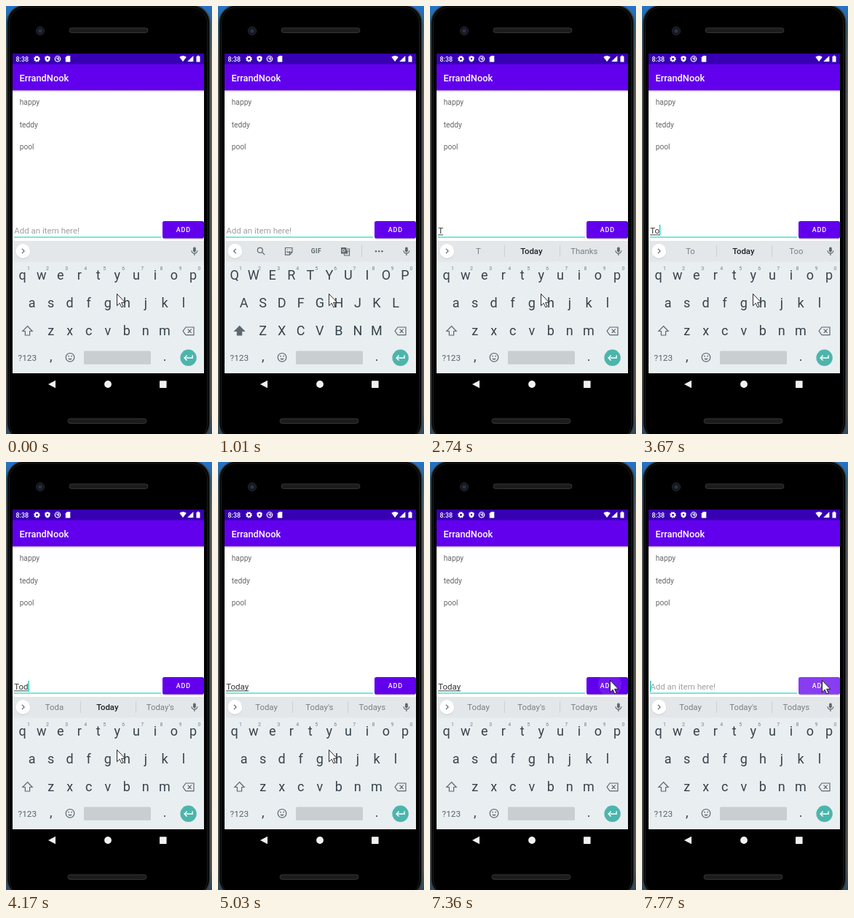
An HTML page that plays this animation: 283x585 px, repeating every 8 s.

```html
<!DOCTYPE html>
<html lang="en">
<head>
<meta charset="utf-8">
<title>To-do list</title>
<style>
html, body { margin: 0; width: 100%; height: 100%; overflow: hidden; background: #55585b; }
svg { display: block; width: 100%; height: 100%; font-family: Roboto, "Noto Sans", sans-serif; }
.mid { text-anchor: middle; }
.medium { font-weight: 500; }
.key { font-size: 18px; fill: #37434a; }
.digit { font-size: 7px; fill: #78838a; }
.tip { font-size: 11.4px; fill: #788086; }
.best { font-weight: 500; fill: #1d2327; }
.line { fill: none; stroke: #5d696f; stroke-width: 1.2; }
.solid { fill: #5d696f; }
</style>
</head>
<body>
<svg viewBox="0 0 283 585">
  <defs>
    <linearGradient id="desk" x2="0" y2="1">
      <stop offset="0" stop-color="#2672c8"/><stop offset=".05" stop-color="#27667d"/>
      <stop offset=".12" stop-color="#5b6063"/><stop offset=".95" stop-color="#53575a"/>
      <stop offset="1" stop-color="#294b63"/>
    </linearGradient>
    <linearGradient id="shade" x2="0" y2="1">
      <stop offset="0" stop-opacity=".25"/><stop offset="1" stop-opacity="0"/>
    </linearGradient>
    <clipPath id="button"><rect x="215" y="294" width="57" height="23.5" rx="2.6"/></clipPath>
  </defs>

  <!-- phone -->
  <rect width="283" height="585" fill="url(#desk)"/>
  <rect x="1.5" y="-1" width="278.5" height="595" rx="24" fill="#070707" stroke="#3b3d3f" stroke-width="1.6"/>
  <rect x="4.5" y="2" width="272" height="590" rx="21" fill="#000" stroke="#1b1b1c"/>
  <circle cx="47" cy="34" r="5.6" fill="#15171c" stroke="#25272b"/>
  <circle cx="47" cy="34" r="2.6" fill="#26324f"/>
  <g fill="#1c1c1d" stroke="#353536">
    <rect x="87" y="30" width="108" height="6.5" rx="3.2"/>
    <rect x="85" y="564" width="108" height="6.5" rx="3.2"/>
  </g>
  <g fill="#f1f1f1">
    <path d="M58 517l10-5.3v10.6z"/><circle cx="140" cy="517" r="4.9"/>
    <rect x="211" y="512.3" width="9.6" height="9.6" rx=".6"/>
  </g>

  <!-- app -->
  <rect x="9" y="65" width="263" height="437" fill="#fff"/>
  <rect x="9" y="115" width="263" height="3" fill="url(#shade)"/>
  <rect x="9" y="65" width="263" height="15" fill="#3700b3"/>
  <rect x="9" y="79.5" width="263" height="35.8" fill="#6200ee"/>
  <g fill="#fff">
    <text x="13.5" y="75.6" font-size="8.9" class="medium">8:38</text>
    <circle cx="42.5" cy="72.3" r="2.5" fill="none" stroke="#fff" stroke-width="2"/>
    <circle cx="42.5" cy="72.3" r="3.8" fill="none" stroke="#fff" stroke-width="1.2" stroke-dasharray="1.5 1.48"/>
    <path d="M57 68l3.6 1.5v2.6q0 3-3.6 4.5q-3.6-1.5-3.6-4.5v-2.6z"/>
    <circle cx="57" cy="72" r="1.2" fill="#3700b3"/>
    <circle cx="71" cy="72.2" r="3.7" fill="none" stroke="#fff" stroke-width="1.2"/>
    <path d="M69.2 70.6l3.6 3.4M71 70.3a2 2 0 0 1 1.9 2" fill="none" stroke="#fff" stroke-width="1.2"/>
    <path d="M84 68h4.3v8.4h-6.5v-6.2z"/>
    <path d="M238.3 69.8q4.8-3.8 9.6 0l-4.8 6.2z"/>
    <path d="M257.4 68v8h-8.2z"/>
    <path d="M263 67.8h2.2v1h1.3v7.6h-5v-7.6h1.5z"/>
    <text x="18.5" y="102.7" font-size="12.8" class="medium">ErrandNook</text>
  </g>
  <g font-size="10.24" fill="#666">
    <text x="18.7" y="135">happy</text><text x="18.7" y="165.6">teddy</text><text x="18.7" y="196.2">pool</text>
  </g>

  <!-- entry row -->
  <g font-size="11.52">
    <text id="hint" x="11.2" y="311" fill="#a0a0a0">Add an item here!</text>
    <text id="entry" x="11.2" y="311" fill="#333"></text>
  </g>
  <rect id="under" x="11.2" y="312.4" height=".9" fill="#333"/>
  <rect x="11" y="315.3" width="202" height="1.4" fill="#3fdccd"/>
  <rect id="caret" y="299" width="1.4" height="15" fill="#19cdbb"/>
  <rect x="215.3" y="295.3" width="56.4" height="23.5" rx="3" fill="#000" opacity=".22"/>
  <g clip-path="url(#button)">
    <rect x="215" y="294" width="57" height="24" fill="#6200ee"/>
    <circle id="ripple" cx="247" cy="304" fill="#fff"/>
  </g>
  <text x="243.8" y="309.3" font-size="8.96" letter-spacing=".8" class="mid medium" fill="#fff">ADD</text>

  <!-- keyboard -->
  <rect x="9" y="321" width="263" height="181" fill="#e9eef1"/>
  <rect x="9" y="321" width="263" height="28.5" fill="#e4e7e9"/>
  <circle cx="23.3" cy="335.6" r="10.3" fill="#c9cdd0"/>
  <circle cx="23.3" cy="335" r="10" fill="#fff"/>
  <path id="chevron" class="line" stroke-width="1.4"/>
  <rect x="257" y="329.5" width="3.8" height="7" rx="1.9" class="solid"/>
  <path d="M255 334.3a3.9 3.9 0 0 0 7.8 0M258.9 338.3v2.7" class="line"/>

  <g id="tools">
    <circle cx="57.8" cy="333.8" r="3.5" class="line"/><path d="M60.5 336.5l3.7 3.7" class="line"/>
    <path d="M92.5 330.5h9.4v6l-3.4 3.6h-6zM101.9 336.5h-3.4v3.6M94.3 335.5q2.2 2.4 4.5 0M95 333h1M98.6 333h1" class="line"/>
    <text x="135" y="338.2" font-size="8.6" font-weight="700" letter-spacing=".4" class="mid solid">GIF</text>
    <path d="M169 330h7l2.5 8.5h-9.5z" class="solid"/>
    <path d="M177 332h3.5v9h-6.5l-1-2.5M176 335h4M178 335q0 2.5-2 3.5" class="line" stroke-width=".9"/>
    <circle cx="172.4" cy="334.3" r="1.7" fill="none" stroke="#fff" stroke-width=".9"/>
    <path d="M197.5 327v16" stroke="#cbd0d3"/>
    <g class="solid"><circle cx="217" cy="335.2" r="1.2"/><circle cx="221.2" cy="335.2" r="1.2"/><circle cx="225.4" cy="335.2" r="1.2"/></g>
  </g>
  <g id="tips">
    <path d="M102.5 327v16M178.5 327v16" stroke="#cbd0d3"/>
    <text x="66.5" y="339.3" class="tip mid"></text>
    <text x="139.3" y="339.3" class="tip mid"></text>
    <text x="211.8" y="339.3" class="tip mid"></text>
  </g>

  <g id="keys"></g>
  <path id="shift" d="M29.5 437.5l6.7 7h-3.6v5.5h-6.2v-5.5h-3.6z" class="line"/>
  <path d="M243 444.3l4-5.3h11v10.6h-11zM249.6 441.6l5.2 5.2M254.8 441.6l-5.2 5.2" class="line"/>
  <text x="29.3" y="484.5" font-size="11.8" class="mid" fill="#566168">?123</text>
  <text x="61.7" y="485" class="key mid">,</text>
  <text x="218" y="485" class="key mid">.</text>
  <circle cx="88" cy="480.3" r="5.8" class="line"/>
  <path d="M85 481.7q3 3.8 6 0z" class="solid"/>
  <circle cx="85.9" cy="478.6" r=".9" class="solid"/><circle cx="90.1" cy="478.6" r=".9" class="solid"/>
  <rect x="107" y="471.5" width="92" height="18.3" rx="1.5" fill="#c9ced1"/>
  <circle cx="250.6" cy="480.8" r="11.2" fill="#4cb5ab"/>
  <path d="M256.2 477.3v3.7h-11M248.6 477.5l-3.5 3.5l3.5 3.5" fill="none" stroke="#fff" stroke-width="1.4"/>

  <path id="mouse" d="M.5.5v16.2l3.7-3.5l2.6 5.6l2.3-1l-2.5-5.5h5.1z" fill="#fff" stroke="#111" stroke-width=".9"/>
</svg>
<script>
const $ = id => document.getElementById(id);
const show = (el, on) => el.setAttribute('visibility', on ? 'visible' : 'hidden');
const set = (el, attrs) => Object.entries(attrs).forEach(([k, v]) => el.setAttribute(k, v));

const LOOP = 8000;
const typed = [[0, ''], [2020, 'T'], [3670, 'To'], [4030, 'Tod'], [4450, 'Toda'], [4760, 'Today'], [7770, '']];
const strip = [[0, ''], [330, 'tools'], [2460, 'T,Today,Thanks'], [3320, 'To,Today,Too'],
  [3830, "Tod,Today,Today's"], [4170, "Toda,Today,Today's"], [4630, "Today,Today's,Todays"]];
const blinks = [0, 2020, 2740, 3320, 5030, 5470, 6010, 6410, 7360, 7770].map((t, i) => [t, i % 2]);
const moves = [[0, [152, 393]], [5740, [223, 168]], [5890, [232, 213]], [6010, [239, 257]],
  [6140, [246, 277]], [6260, [250, 289]], [6410, [247, 298]]];
const ripples = [[0, [0, 0]], [7360, [16, .09]], [7640, [34, .18]], [7770, [60, .24]]]; // radius, opacity
const at = (steps, t) => steps.findLast(s => s[0] <= t)[1];

const label = (x, y, text, kind) => `<text x="${x}" y="${y}" class="mid ${kind}">${text}</text>`;
$('keys').innerHTML = [['qwertyuiop', 22.6, 374.3], ['asdfghjkl', 35.6, 412.3], ['zxcvbnm', 61.6, 450]]
  .map(([row, x, y]) => [...row].map((c, i) => label(x + i * 26.05, y, c, 'key')).join('')).join('')
  + [...'1234567890'].map((c, i) => label(31 + i * 26.05, 361, c, 'digit')).join('');
const letters = [...document.querySelectorAll('#keys .key')];
const tips = [...document.querySelectorAll('.tip')];

function draw() {
  const t = performance.now() % LOOP;

  const text = at(typed, t), entry = $('entry');
  entry.textContent = text;
  const width = text ? entry.getComputedTextLength() : 0;
  show($('hint'), !text);
  $('under').setAttribute('width', width);
  $('caret').setAttribute('x', 11 + width);
  show($('caret'), at(blinks, t));

  const mode = at(strip, t), tools = mode === 'tools';
  const words = mode.includes(',') ? mode.split(',') : null;
  show($('tools'), tools);
  show($('tips'), words);
  if (words) tips.forEach((el, i) => el.textContent = words[i]);
  tips[1].classList.toggle('best', t < 4630);
  $('chevron').setAttribute('d', tools ? 'M24.8 331.8l-3.2 3.2l3.2 3.2' : 'M21.9 331.8l3.2 3.2l-3.2 3.2');

  const caps = t >= 1010 && t < 1470;
  letters.forEach(el => {
    const c = el.textContent;
    el.textContent = caps ? c.toUpperCase() : c.toLowerCase();
  });
  $('shift').style.fill = caps ? '#5d696f' : 'none';

  const [r, opacity] = at(ripples, t);
  set($('ripple'), { r, opacity });
  $('mouse').setAttribute('transform', `translate(${at(moves, t)})`);
  requestAnimationFrame(draw);
}
draw();
</script>
</body>
</html>
```
